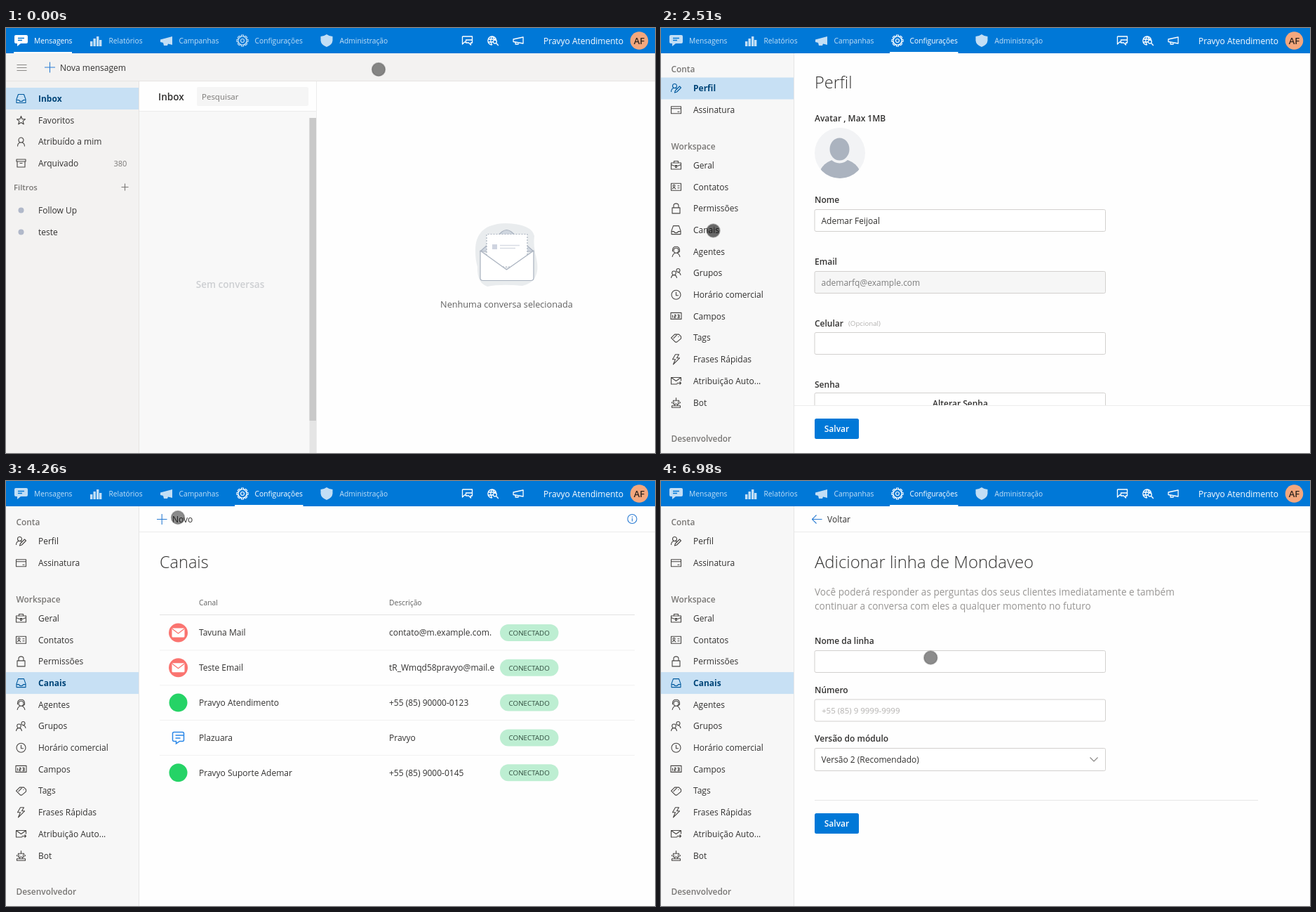
Recreate the animation shown at these times as an HTML page. Size 925 by 605 pixels, loop 9.94 s.

```html
<!DOCTYPE html>
<html lang="pt-BR">
<head>
<meta charset="utf-8">
<title>Configurar canal</title>
<style>
html, body { margin: 0; width: 100%; height: 100%; overflow: hidden; background: #fff; }
svg { display: block; width: 925px; height: 605px; }
text { font-family: "Open Sans", "Noto Sans", sans-serif; fill: #323130; white-space: pre; }
.b { font-weight: 600; }
.light { font-weight: 300; }
.mid { text-anchor: middle; }
.i { fill: none; stroke: #484644; stroke-width: 1.1; stroke-linejoin: round; }
.blue { stroke: #2b7cd3; }
.nav { opacity: .76; }
.nav .line { display: none; }
.nav text { fill: #fff; }
.nav.on { opacity: 1; }
.nav.on .line { display: inline; }
.row rect { fill: none; }
.row.on rect { fill: #c7e0f4; }
.row.on text { fill: #004578; font-weight: 700; }
.row.on .i { stroke: #005a9e; }
</style>
</head>
<body>
<svg id="stage" viewBox="0 0 925 605"></svg>
<script>
const BLUE = '#0078d7';
const LOOP = 9940, STEP = 109;

const ICONS = {
  inbox: 'M-6.500 6V1L-4-6H4L6.500 1V6ZM-6.500 2H-3Q-3 4 0 4T3 2H6.500',
  star: 'M0-6L1.600-1.800L6-1.600L2.600 1.200L3.800 5.500L0 3L-3.800 5.500L-2.600 1.200L-6-1.600L-1.600-1.800Z',
  person: 'M0-6A3.500 3.500 0 1 1 0 1A3.500 3.500 0 1 1 0-6M-5 6.500Q-5 1 0 1T5 6.500',
  archive: 'M-6.500-5.500H6.500V-2.500H-6.500ZM-5.500-2.500V5.500H5.500V-2.500M-2 0H2',
  plus: 'M-5 0H5M0-5V5',
  edit: 'M-2-6.500A3 3 0 1 1-2-.500A3 3 0 1 1-2-6.500M-7 5Q-7-.500-2-.500Q0-.500 1 .500M-2 6L-1 3L5-3L7-1L1 5Z',
  card: 'M-7-5H7V5H-7ZM-7-2H7M2 2.500H5',
  case: 'M-7-3.500H7V5.500H-7ZM-3-3.500V-6H3V-3.500M-7-1Q0 3 7-1M-1 0H1V3H-1Z',
  contact: 'M-7-5H7V5H-7ZM-3-3A1.500 1.500 0 1 1-3 0A1.500 1.500 0 1 1-3-3M-5.500 3Q-3-1-.500 3M2-1.500H5M2 1.500H5',
  lock: 'M-5.500-1H5.500V7H-5.500ZM-3.500-1V-4Q-3.500-7 0-7T3.500-4V-1',
  agent: 'M0-5A3.500 3.500 0 1 1 0 2A3.500 3.500 0 1 1 0-5M-5.500 7.500Q-4 2 0 2T5.500 7.500M-5 0V-2Q-5-7 0-7T5-2V0L2 2',
  group: 'M-3-3A2.800 2.800 0 1 1-3 2.600A2.800 2.800 0 1 1-3-3M-7 7Q-6.500 2.600-3 2.600T1 7M3-6.500A2.500 2.500 0 1 1 3-1.500A2.500 2.500 0 1 1 3-6.500M2-1.300Q6-1.500 6.500 3',
  clock: 'M0-6.500A6.500 6.500 0 1 1 0 6.500A6.500 6.500 0 1 1 0-6.500M0-4V1H3.500',
  fields: 'M-7.500-5H7.500V4H-7.500ZM-5-2V2M-2.500-2H-.500V0H-2.500V2H-.500M2-2H4.500V2H2M2.500 0H4.500',
  tag: 'M-7 0L-2-5H4L7-2V1L1 6H-1ZM3.500-2V-1M-4 1L1-4',
  bolt: 'M-1-7H4L1-2H5L-4 7L-1 0H-5Z',
  send: 'M2 4.500H-7V-5H7V0M-7-5L0 0L7-5M1 3H7M5 1L7 3L5 5',
  bot: 'M-4-3H4V2H-4ZM0-3V-7M-2-1V0M2-1V0M-6 7V4.500H6V7ZM-2 2V4.500M2 2V4.500M-6-1V1M6-1V1',
  menu: 'M-7-4H7M-7 0H7M-7 4H7',
  back: 'M7 0H-7M-1-6L-7 0L-1 6',
  info: 'M0-6.500A6.500 6.500 0 1 1 0 6.500A6.500 6.500 0 1 1 0-6.500M0-1V3.500M0-3.500V-2',
  mail: 'M-8-5.500H8V5.500H-8ZM-8-5.500L0 1L8-5.500',
  chats: 'M-7-6H7V-1M7 0V3H5V6L2 3H-2V-1H7ZM-2 2H-4L-7 5V-6',
  globe: 'M5 0A6 6 0 1 0-1 6M-1-6Q-5 0-1 6M-1-6Q2-4 2-1M-7-2H5M-6 2H0M3-1A2.500 2.500 0 1 1 3 4A2.500 2.500 0 1 1 3-1M5 3.500L8 7',
  horn: 'M-7-2L7-5V4L-7 1.500ZM-4 2V5H0L1 3',
  gear: 'M0-2.800A2.800 2.800 0 1 1 0 2.800A2.800 2.800 0 1 1 0-2.800'
};

const icon = (name, x, y, attr = '') =>
  `<path class="i" transform="translate(${x} ${y})" d="${ICONS[name]}" ${attr}/>`;
const text = (x, yc, s, size = 12, cls = '', fill = '') =>
  `<text x="${x}" y="${yc + size * .36}" font-size="${size}" class="${cls}" ${fill && `style="fill:${fill}"`}>${s}</text>`;
const rect = (x, y, w, h, fill, more = '') =>
  `<rect x="${x}" y="${y}" width="${w}" height="${h}" fill="${fill}" ${more}/>`;
const disc = (x, y, r, fill) => `<circle cx="${x}" cy="${y}" r="${r}" fill="${fill}"/>`;
const hline = (x, y, w, fill = '#ececec') => rect(x, y, w, 1, fill);
const group = (id, body) => `<g id="${id}">${body}</g>`;
const field = (y, h = 31, fill = '#fff') =>
  rect(219, y + .5, 414.5, h, fill, 'rx="2" stroke="#d2d0ce"');
const button = y => rect(219, y, 63, 29, BLUE, 'rx="2.500"') + text(250.5, y + 15, 'Salvar', 12, 'b mid', '#fff');
const blueIcon = (name, x, y) => icon(name, x, y, `style="stroke:#2b7cd3"`);
const sideRow = (name, label, y, on = '') =>
  `<g class="row ${on}">${rect(0, y - 15.5, 189, 31, 'none')}${icon(name, 21.5, y)}${text(46, y, label)}</g>`;

function navBar() {
  const gearTeeth = Array.from({ length: 8 }, (_, i) =>
    `<path d="M-2-6L-1.300-8H1.300L2-6" transform="rotate(${i * 45})"/>`).join('');
  const pics = [
    `<path d="M14 10h15q2 0 2 2v8q0 2-2 2h-8l-5 4v-4h-2q-2 0-2-2v-8q0-2 2-2Z" fill="#fff"/><path d="M17 14.500h9M17 17.500h6" stroke="${BLUE}" stroke-width="1.300"/>`,
    [[120, 7], [124.500, 11], [129, 14], [133, 9]].map(([x, h]) => rect(x, 26 - h, 3.4, h, '#fff')).join(''),
    `<path d="M220 16.500L237 12V24L231 22.500L230 25H225L224 21L220 20Z" fill="#fff"/>`,
    `<g transform="translate(337 18)" fill="none" stroke="#fff" stroke-width="1.200"><circle r="6"/><circle r="2.500"/>${gearTeeth}</g>`,
    `<path d="M457 9Q461 12 465.500 12V18Q465 24 457 27Q449 24 448.500 18V12Q453 12 457 9Z" fill="#fff"/>`
  ];
  const tabs = [['Mensagens', 40, 11, 94], ['Relatórios', 146.5, 120, 194], ['Campanhas', 246.5, 220, 302],
    ['Configurações', 354.5, 326, 423.5], ['Administração', 475.5, 448, 544]];
  return rect(0, 0, 925, 36, BLUE) +
    tabs.map(([s, x, a, b], i) =>
      `<g class="nav">${pics[i]}${text(x, 18.5, s, 10.25)}<rect class="line" x="${a}" y="34" width="${b - a}" height="2" fill="#fff"/></g>`).join('') +
    ['chats', 'globe', 'horn'].map((n, i) => icon(n, 657.5 + i * 36.3, 18, 'style="stroke:#fff;stroke-width:1.300"')).join('') +
    text(766, 18.5, 'Pravyo Atendimento', 12, '', '#fff') +
    disc(902.5, 18, 12.8, '#f4a77d') + text(902.5, 18.5, 'AF', 13, 'b mid', '#33261f');
}

function inboxPage() {
  const envelope =
    `<path d="M669 318Q668 279 712 278Q749 279 753 296Q751 310 756 328Q763 361 736 367Q705 364 686 368Q671 363 672 340Q669 330 669 318Z" fill="#e9ecee"/>
    <g stroke="#a9b2bf" stroke-width="1.200" stroke-linejoin="round">
    <path d="M676 318L707 290Q713.500 285 720 290L752 318Z" fill="#cfd6df"/>
    <path d="M685 340V293.500H743V340Z" fill="#fff" stroke-dasharray="2 2"/>
    <path d="M676 317L713.500 344L752 317V356Q752 359.500 748 359.500H680Q676 359.500 676 356Z" fill="#fff"/></g>
    ${rect(693, 308, 7, 7, '#cfd4e0')}<path d="M704 309.500h28M704 313.500h22" stroke="#d8dce4" stroke-width="1.500"/>`;
  const dots = [['Follow Up', 259.5], ['teste', 290.5]];
  return rect(0, 36, 925, 39, '#f3f2f1') + hline(0, 75, 925, '#e6e4e2') +
    icon('menu', 22.5, 56.5, 'style="stroke:#8a8886"') +
    `<path class="i blue" d="M55 56h15M62.500 48.500v15"/>` + text(77, 56.5, 'Nova mensagem') +
    rect(0, 76, 189, 529, '#f3f2f1') + rect(189, 76, 1, 529, '#e6e4e2') +
    sideRow('inbox', 'Inbox', 100.5, 'on') + sideRow('star', 'Favoritos', 131.5) +
    sideRow('person', 'Atribuído a mim', 162) + sideRow('archive', 'Arquivado', 192.5) +
    text(153.5, 193, '380', 11, '', '#797775') +
    text(11, 226.5, 'Filtros', 11.3, 'b', '#797775') + icon('plus', 169.5, 226.5, 'style="stroke:#797775"') +
    dots.map(([s, y]) => disc(21.5, y, 4, '#b0b8c9') + text(46, y, s)).join('') +
    rect(190, 119, 252, 486, '#f8f8f8') + hline(190, 118, 252) +
    text(217, 98.5, 'Inbox', 13.6, 'b') + rect(272, 84, 159, 27, '#f5f5f5', 'rx="2"') +
    text(279, 97.5, 'Pesquisar', 11.5, '', '#797775') +
    rect(432.5, 128, 9.5, 477, '#e5e5e5') + rect(432.5, 128, 9.5, 431, '#c9c9c9') +
    rect(442, 76, 1, 529, '#ececec') +
    text(319.5, 365, 'Sem conversas', 13.6, 'b mid', '#cdcfd2') +
    envelope + text(713.5, 393, 'Nenhuma conversa selecionada', 12.7, 'mid', '#616161');
}

function sidebar() {
  const first = [['edit', 'Perfil'], ['card', 'Assinatura']];
  const rest = [['case', 'Geral'], ['contact', 'Contatos'], ['lock', 'Permissões'], ['inbox', 'Canais'],
    ['agent', 'Agentes'], ['group', 'Grupos'], ['clock', 'Horário comercial'], ['fields', 'Campos'],
    ['tag', 'Tags'], ['bolt', 'Frases Rápidas'], ['send', 'Atribuição Auto...'], ['bot', 'Bot']];
  const head = (s, y) => text(14.5, y, s, 11.9, 'b', '#797775');
  return rect(0, 36, 189, 569, '#f7f7f7') + rect(189, 36, 1, 569, '#e6e6e6') +
    head('Conta', 59) + first.map(([n, s], i) => sideRow(n, s, 86 + i * 30.7)).join('') +
    head('Workspace', 168.5) + rest.map(([n, s], i) => sideRow(n, s, 195.5 + i * 30.7)).join('') +
    head('Desenvolvedor', 584.5) +
    group('sideBar', rect(180.5, 38, 6.5, 442, '#c6c6c6', 'rx="3.200"'));
}

function profilePage() {
  return text(219, 78, 'Perfil', 23.5, 'light') + text(219, 128.5, 'Avatar , Max 1MB', 12, 'b') +
    `<clipPath id="round"><circle cx="255" cy="178" r="36"/></clipPath>` + disc(255, 178, 36, '#f2f3f5') +
    `<g clip-path="url(#round)" fill="#abb3bf"><ellipse cx="255" cy="214" rx="31" ry="28"/>
    <ellipse cx="254.500" cy="172.500" rx="16" ry="18" stroke="#f2f3f5" stroke-width="4"/></g>` +
    text(219, 245, 'Nome', 12, 'b') + field(258) + text(228.5, 275, 'Ademar Feijoal') +
    text(219, 332.5, 'Email', 12, 'b') + field(346, 31, '#f6f6f6') + text(228.5, 362.5, 'ademarfq@example.com', 12, '', '#7d7d7d') +
    text(219, 420.5, 'Celular', 12, 'b') + text(267, 421, '(Opcional)', 9.7, '', '#b3b1af') + field(433) +
    text(219, 508, 'Senha', 12, 'b') + field(519) + text(426.5, 535, 'Alterar Senha', 12, 'b mid') +
    rect(190, 537, 735, 68, '#fff') + hline(190, 537, 735) + button(556);
}

const toolbar = (name, label) =>
  hline(190, 72, 735) + (name === 'plus'
    ? `<path class="i blue" d="M215 54.500h14.500M222.200 47v15"/>` : blueIcon(name, 222.5, 54.5)) + text(237, 54.5, label);

function channelsHead() {
  return toolbar('plus', 'Novo') + blueIcon('info', 892.5, 54) + text(219, 115.5, 'Canais', 23.5, 'light');
}

function channelList() {
  const rows = [['mail', 'Tavuna Mail', 'contato@m.example.com.'], ['mail', 'Teste Email', 'tR_Wmqd58pravyo@mail.e'],
    ['call', 'Pravyo Atendimento', '+55 (85) 90000-0123'], ['chat', 'Plazuara', 'Pravyo'],
    ['call', 'Pravyo Suporte Ademar', '+55 (85) 9000-0145']];
  const mark = {
    mail: y => disc(245.5, y, 13.5, '#fa7470') + rect(236.5, y - 6.5, 18, 13, '#fff', 'rx="1.500"') +
      `<path d="M237 ${y - 5.5}l8.500 6.500l8.500-6.500" fill="none" stroke="#fa7470" stroke-width="1.300"/>`,
    call: y => disc(245.5, y, 13, '#25d366'),
    chat: y => `<path transform="translate(245.500 ${y})" d="M-6-8H6Q8-8 8-6V3Q8 5 6 5H2L-3 8.500V5H-6Q-8 5-8 3V-6Q-8-8-6-8ZM-4-3.500H8M-4 .500H3" fill="none" stroke="#2b88e8" stroke-width="1.500"/>`
  };
  return text(275, 173.5, 'Canal', 10.25, '', '#616161') + text(546, 173.5, 'Descrição', 10.25, '', '#616161') +
    hline(219, 190, 677, '#e2e2e2') + rows.map(([kind, name, info], i) => {
      const y = 216 + i * 49.8;
      return mark[kind](y) + text(275, y, name) + text(546, y, info) +
        rect(704, y - 12, 83.5, 24, '#bdeed2', 'rx="12"') + text(745.7, y + .5, 'CONECTADO', 9.8, 'mid', '#2f4a3c') +
        (i < 4 ? hline(219, y + 24.5, 677, '#f1f1f1') : '');
    }).join('');
}

function addPage() {
  const gray = '#c8c8c8';
  const dot = y => disc(311, y, 11.5, gray);
  const box = y => rect(300, y - 11, 22, 22, gray);
  const env = y => rect(300, y - 9, 22, 17, gray, 'rx="1.500"') +
    `<path d="M300 ${y - 6}l11 7l11-7" fill="none" stroke="#fff" stroke-width="1.600"/>`;
  const see = s => `Veja e responda mensagens do ${s} na sua caixa de entrada`;
  const rows = [[dot, 'Mondaveo', see('Mondaveo')], [box, 'Olharimba Direct (Beta)', see('Olharimba')],
    [box, 'Plazuara', see('Papearino')], [dot, 'Velotrama', see('Velotrama')],
    [env, 'Email', 'Veja e responda seus email direto da sua caixa de entrada do Pravyo']];
  return text(557.5, 118.5, 'Adicionar canal', 20.2, 'b mid') +
    text(557.5, 146.5, 'Conecte aos aplicativos de mensagens mais usados pelos seus clientes e responda', 13.6, 'mid', '#979593') +
    text(557.5, 169, 'todos em sua caixa de entrada.', 13.6, 'mid', '#979593') +
    rows.map(([pic, name, info], i) => {
      const y = 235.5 + i * 82.1;
      return pic(y + 2.5) + text(333.5, y, name, 14.4) + text(333.5, y + 26, info, 12, '', '#8f8d8b') +
        (i < 4 ? hline(286, Math.round(y + 53), 542, '#e6e6e6') : '');
    }).join('') + group('listBar', rect(822, 209, 3, 283, '#b3b3b3', 'rx="1.500"'));
}

function linePage() {
  const gray = '#979593';
  return text(219, 115.5, 'Adicionar linha de Mondaveo', 23.9, 'light') +
    text(219, 158, 'Você poderá responder as perguntas dos seus clientes imediatamente e também', 13.6, '', gray) +
    text(219, 178, 'continuar a conversa com eles a qualquer momento no futuro', 13.6, '', gray) +
    text(219, 228, 'Nome da linha', 12, 'b') + field(241) +
    text(219, 297.5, 'Número', 12, 'b') + field(310.5) + text(229, 327, '+55 (85) 9 9999-9999', 11.5, '', '#b3b1af') +
    text(219, 367, 'Versão do módulo', 12, 'b') + field(380, 32) + text(228.5, 397, 'Versão 2 (Recomendado)') +
    `<path class="i" d="M611.500 393.500l5.500 5.500l5.500-5.500" style="stroke:#8a8886"/>` +
    hline(219, 454, 632, '#e6e6e6') + button(473);
}

const stage = document.getElementById('stage');
stage.innerHTML = rect(0, 0, 925, 605, '#fefefe') +
  group('inbox', inboxPage()) + group('side', sidebar()) + group('profile', profilePage()) +
  group('channels', channelsHead()) +
  group('spin', `<path d="M0-11A11 11 0 0 1 11 0" transform="rotate(-18)" fill="none" stroke="#c2c2c2" stroke-width="2.500"/>`) +
  group('list', channelList()) + group('back', toolbar('back', 'Voltar')) +
  group('add', addPage()) + group('line', linePage()) +
  group('status', `<path d="M0 585.500H303Q307 585.500 307 589.500V605H0Z" fill="#dee1e6"/>` +
    text(4.5, 595.5, 'Waiting for api.pravyo.com.br...', 10.25, '', '#45484c')) +
  navBar() +
  `<circle id="cursor" r="9.300" stroke="#5a5a5a" stroke-opacity=".45" stroke-width="1.800"/>`;

const $ = id => document.getElementById(id);
const tabs = stage.querySelectorAll('.nav');
const rows = $('side').querySelectorAll('.row');

// First and last step at which each part is visible
const SHOWN = { inbox: [0, 12], side: [13, 99], profile: [13, 24], channels: [25, 44], spin: [25, 28],
  sideBar: [25, 28], list: [29, 44], back: [45, 99], add: [45, 62], listBar: [45, 50], status: [46, 48], line: [63, 99] };
const PRESSED = [[10, 12], [23, 27], [41, 42], [60, 61]];

// Pointer path: step, x, y, eased arrival
const PATH = [[0, 531, 59], [9, 393, 17, 1], [12, 393, 17], [13, 378, 28], [14, 330, 64], [17, 124, 232],
  [18, 106, 262], [19, 95, 280], [21, 74.5, 288.5], [33, 74.5, 288.5], [34, 90, 276], [36, 240, 160], [37, 291, 98],
  [38, 270, 64], [39, 245, 52], [41, 245, 52], [43, 250.5, 62], [52, 250.5, 62], [57, 384.3, 251.5, 1], [99, 384.3, 251.5]];

function pointer(step) {
  const k = PATH.findIndex(p => p[0] > step);
  const [s0, x0, y0] = PATH[k - 1], [s1, x1, y1, eased] = PATH[k];
  let p = (step - s0) / (s1 - s0);
  if (eased) p = (1 - Math.cos(Math.PI * p)) / 2;
  return [x0 + (x1 - x0) * p, y0 + (y1 - y0) * p];
}

function draw(now) {
  const step = Math.floor(now % LOOP / STEP);
  const within = ([a, b]) => step >= a && step <= b;
  for (const id in SHOWN) $(id).style.display = within(SHOWN[id]) ? '' : 'none';
  tabs.forEach((tab, i) => tab.classList.toggle('on', i === (step < 13 ? 0 : 3)));
  rows.forEach((row, i) => row.classList.toggle('on', i === (step < 25 ? 0 : 5)));
  $('listBar').style.opacity = step < 49 ? 1 : step < 50 ? .7 : .35;
  $('spin').setAttribute('transform', `translate(557.5 257) rotate(${(step - 27) * 40})`);
  $('cursor').setAttribute('transform', `translate(${pointer(step)})`);
  $('cursor').setAttribute('fill-opacity', PRESSED.some(within) ? .58 : .45);
}

(function tick() {
  draw(performance.now());
  requestAnimationFrame(tick);
})();
</script>
</body>
</html>
```
